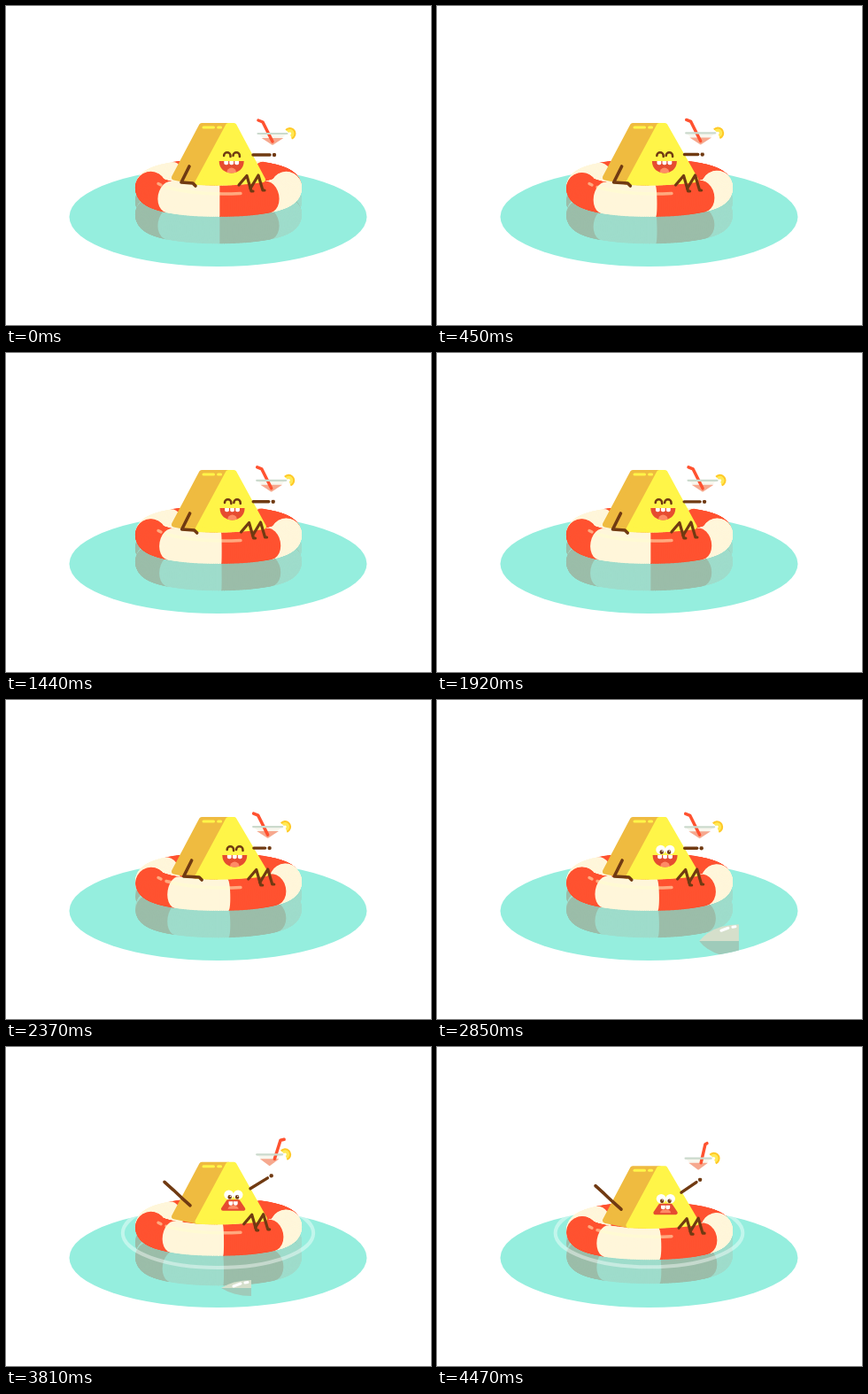
Write an HTML page with a canvas that moves like this. It is 480 by 360 pixels and loops after 4500 ms.

```html
<!DOCTYPE html>
<html lang="en">
<head>
<meta charset="utf-8">
<title>Floating wedge</title>
<style>
html, body { margin: 0; height: 100%; overflow: hidden; background: #fff; }
canvas { display: block; }
</style>
</head>
<body>
<canvas id="stage" width="480" height="360"></canvas>
<script>
const ctx = document.getElementById('stage').getContext('2d');
const LOOP = 4500, SWAY = 1700, TAU = Math.PI * 2;
const RED = '#ff5230', CREAM = '#fff6da', BROWN = '#703a12', YELLOW = '#fff548';

const ramp = (t, from, to) => {
  const u = Math.min(1, Math.max(0, (t - from) / (to - from)));
  return u * u * (3 - 2 * u);
};
const mix = (a, b, k) => Array.isArray(a) ? a.map((v, i) => mix(v, b[i], k)) : a + (b - a) * k;

function trace(points, close) {
  ctx.beginPath();
  points.forEach(p => ctx.lineTo(...p));
  if (close) ctx.closePath();
}
function line(points, color, width) {
  trace(points);
  ctx.strokeStyle = color;
  ctx.lineWidth = width;
  ctx.stroke();
}
function fill(color) {
  ctx.fillStyle = color;
  ctx.fill();
}
function blob(points, color, width) {
  trace(points, true);
  fill(color);
  ctx.strokeStyle = color;
  ctx.lineWidth = width;
  ctx.stroke();
}
function oval(x, y, rx, ry, color) {
  ctx.beginPath();
  ctx.ellipse(x, y, rx, ry, 0, 0, TAU);
  fill(color);
}

// Poses: calm follows the sway w, scared raises the arms, peak is the stretched jump.
const calm = w => ({
  body: [[190, 193.5], [221, 135], [251, 135], [257.5, 135], [290 + 4 * w, 196], [216.5, 199]],
  armL: [[207 + 3 * w, 181], [198 + 3 * w, 199], [211 + 8 * w, 200], [214 + 8 * w, 203]],
  shoulder: [279 + w, 168 - w],
  hand: [303 - 6 * w, 168 - w],
  legs: [[[263, 202], [272, 191.5], [277, 209], [279, 209]], [[276, 206], [285, 191], [290, 208], [292, 208]]]
    .map(leg => leg.map(([x, y]) => [x + 12 * w, y])),
  eyes: [255 + 4 * w, 169, 5.4, 5.3],
  mouth: [254.7 + 4 * w, 175, 188.5, 9, 12],
  straw: [[0, -4], [-11, -26], [-16, -28]],
  glass: [-2, -11, -13, 16.5]
});
const scared = w => Object.assign(calm(w), {
  armL: [[208, 181], [198, 172], [189, 163.5], [179, 154.5]],
  shoulder: [276, 162],
  hand: [303 - 7 * w, 147.5],
  mouth: [254.7 + 4 * w, 176.5, 185, 6, 11.7],
  straw: [[9 - 7 * w, -8], [18 - 12 * w, -29], [25 - 18 * w, -30]],
  glass: [-2, -11, -13, 14.5]
});
const peak = {
  body: [[198, 196], [228, 69], [248, 69], [251, 69], [285, 197], [220, 199]],
  armL: [[215, 152], [208, 134], [201, 115], [194, 97]],
  shoulder: [268, 122],
  hand: [287, 105.5],
  legs: [[[263, 202], [280, 171], [279, 165], [279, 162]], [[277, 200], [292, 171], [292, 165], [292, 161]]],
  eyes: [251.5, 104, 5.5, 9],
  mouth: [250.7, 116, 134, 7, 8.5],
  straw: [[0, -60], [1, -88], [0, -100]],
  glass: [-2, -17, -22, 13.5]
};
function blend(a, b, k) {
  const out = {};
  for (const key in a) out[key] = mix(a[key], b[key], k);
  return out;
}

// Torus swept from the far side to the near side.
function tube(cy, turn, colors) {
  const R = 76.5, r = 16.4, tilt = 0.196, sector = 47;
  ctx.lineWidth = 2.4;
  const slice = deg => {
    const a = deg * Math.PI / 180, color = colors[Math.floor((deg - turn) / sector) & 1];
    ctx.beginPath();
    for (let j = 0; j < 24; j++) {
      const b = j / 24 * TAU, d = R + r * Math.cos(b);
      ctx.lineTo(240 + d * Math.sin(a), cy + d * tilt * Math.cos(a) - r * Math.sin(b));
    }
    ctx.closePath();
    ctx.strokeStyle = color;
    fill(color);
    ctx.stroke();
  };
  for (let deg = 180; deg >= 0; deg -= 1.5) {
    slice(deg);
    slice(-deg);
  }
}

function ringShine() {
  const color = 'rgba(255,255,205,.5)';
  line([[172, 200.5], [175, 202]], color, 3.4);
  ctx.beginPath();
  ctx.moveTo(181, 204.5);
  ctx.quadraticCurveTo(216, 214, 265, 211.5);
  ctx.stroke();
}

function fin(t) {
  const height = 34 * ramp(t, 2520, 3140) * (1 - ramp(t, 3480, 3980));
  if (height < 0.3) return;
  const u = (t - 2850) / 480, x = 341 - 44 * u + 6 * u * u, level = 272;
  const half = (dir, color) => {
    ctx.save();
    ctx.beginPath();
    ctx.rect(x - 60, dir < 0 ? level - 60 : level, 60, 60);
    ctx.clip();
    ctx.translate(x, level + dir * (height - 34));
    ctx.scale(1, dir);
    oval(0, 0, 50, 34, color);
    if (dir < 0) {
      line([[-20, 27], [-12, 30]], '#fff', 3);
      line([[-7, 31], [-4, 31.5]], '#fff', 3);
    }
    ctx.restore();
  };
  half(1, '#9fcbba');
  half(-1, '#d5dfcb');
}

function drink(pose, k) {
  const [dx, dy, rim, half] = pose.glass;
  ctx.save();
  ctx.translate(pose.hand[0] + dx, pose.hand[1] + dy);
  const top = rim + 5, wide = half * 0.75;
  trace([[-half, rim], [half, rim], [0, 1]]);
  fill('#f8f7ee');
  line([[0, 0], [-dx, -dy - 3]], '#fff', 2);
  trace([[-wide, top], [wide, top], [0, 0]]);
  fill('#f6a88e');
  if (k > 0.03) line([[0, top], [0, top - 42 * k]], '#ff9f86', 13);
  line(pose.straw, RED, mix(3.5, 2.5, k));
  line([[-half, rim], [half, rim]], '#cbdacd', 2.2);
  ctx.translate(half + 3 - k * 3, rim);
  ctx.lineCap = 'butt';
  for (const [radius, color, width] of [[3.8, '#ffe956', 4.4], [6, '#ffc927', 2]]) {
    ctx.beginPath();
    ctx.arc(0, 0, radius, -2.4, 1.2);
    ctx.strokeStyle = color;
    ctx.lineWidth = width;
    ctx.stroke();
  }
  ctx.restore();
}

function wedge(body, k) {
  const [a, b, c, d, e, f] = body;
  blob([a, b, c, f], '#efbb40', 6);
  ctx.beginPath();
  ctx.moveTo(...c);
  ctx.lineTo(...d);
  ctx.lineTo(...e);
  ctx.quadraticCurveTo(250, 201.5, ...f);
  ctx.closePath();
  fill(YELLOW);
  ctx.strokeStyle = YELLOW;
  ctx.lineWidth = 6;
  ctx.stroke();
  const y = b[1] + 2 + 2 * k, span = c[0] - b[0];
  line([[b[0] + 2, y], [b[0] + span * 0.45, y]], YELLOW, 3 + 2.5 * k);
  line([[b[0] + span * 0.62, y], [b[0] + span * 0.72, y]], YELLOW, 3 + 2.5 * k);
}

function face(pose, open, shout, k) {
  const [ex, ey, rx, ry] = pose.eyes;
  for (const side of [-1, 1]) {
    const x = ex + side * 5.2;
    if (open) {
      const px = ex + side * (4.2 - k), py = ey + ry * 0.5;
      oval(x, ey, rx, ry, '#fff');
      oval(px, py, 2.2, 2.4 + 1.4 * k, BROWN);
      oval(px + 0.6, py - 1, 0.7, 0.7, '#fff');
    } else {
      ctx.beginPath();
      ctx.arc(x, ey, 3.7, Math.PI, TAU);
      ctx.lineTo(x + 3.7, ey + 1);
      ctx.strokeStyle = BROWN;
      ctx.lineWidth = 2.5;
      ctx.stroke();
    }
  }
  const [mx, top, bottom, upper, lower] = pose.mouth, color = '#e64c30';
  ctx.save();
  if (shout) {
    blob([[mx - upper, top], [mx + upper, top], [mx + lower, bottom], [mx - lower, bottom]], color, 4);
  } else {
    ctx.beginPath();
    ctx.moveTo(mx - 14, top);
    ctx.lineTo(mx + 14, top);
    ctx.bezierCurveTo(mx + 14, bottom + 4.5, mx - 14, bottom + 4.5, mx - 14, top);
    fill(color);
  }
  ctx.clip();
  oval(mx, bottom, shout ? 6 : 5.5, shout ? 4 + 4 * k : 6, '#ff8b66');
  const tall = shout ? 4.5 + 3 * k : 4.2;
  for (const x of shout ? [-2.7, 2.7] : [-6, 0, 6]) {
    ctx.beginPath();
    ctx.roundRect(mx + x - 2.4, top - 1, 4.8, tall + 1, [0, 0, 2, 2]);
    fill('#fff');
  }
  ctx.restore();
}

function draw(t) {
  const w = (1 - Math.cos(t / SWAY * TAU)) / 2;
  const turn = 9 * w;
  const k = ramp(t, 3060, 3290) * (1 - ramp(t, 3410, 3650));
  const afraid = t > 3330;
  const bob = -2.2 * ramp(t, 3520, 3760) * Math.cos((t - 3810) / 1320 * TAU);
  const pose = blend(afraid ? scared(w) : calm(w), peak, k);

  ctx.clearRect(0, 0, 480, 360);
  ctx.lineCap = ctx.lineJoin = 'round';

  ctx.save();
  ctx.beginPath();
  ctx.ellipse(239.5, 238, 168, 56, 0, 0, TAU);
  fill('#95eede');
  ctx.clip();
  for (const cy of [220, 235.5 - bob * 0.5]) tube(cy, turn, ['#9bbda9', '#9edccb']);
  fin(t);
  if (t > 3570) {
    const u = (t - 3570) % 690 / 690;
    ctx.beginPath();
    ctx.ellipse(239.5, 210, 93 + 42 * u, 33 + 17 * u, 0, 0, TAU);
    ctx.strokeStyle = `rgba(255,255,255,${0.42 * Math.min(1, 1.6 * (1 - u))})`;
    ctx.lineWidth = 4;
    ctx.stroke();
  }
  ctx.restore();

  ctx.save();
  ctx.translate(0, bob);
  tube(205.2, turn, [RED, CREAM]);
  ringShine();
  wedge(pose.body, k);
  face(pose, t > 2640, afraid || k > 0.2, k);
  line(pose.armL, BROWN, 3.6);
  pose.legs.forEach(leg => line(leg, BROWN, 3.2));
  const [sx, sy] = pose.shoulder, [hx, hy] = pose.hand;
  const reach = 1 - 5 / Math.hypot(hx - sx, hy - sy);
  line([[sx, sy], [mix(sx, hx, reach), mix(sy, hy, reach)]], BROWN, 3.4);
  oval(hx, hy, 2.2, 2.2, BROWN);
  drink(pose, k);
  ctx.restore();
}

function frame(now) {
  draw(now % LOOP);
  requestAnimationFrame(frame);
}
requestAnimationFrame(frame);
</script>
</body>
</html>
```
